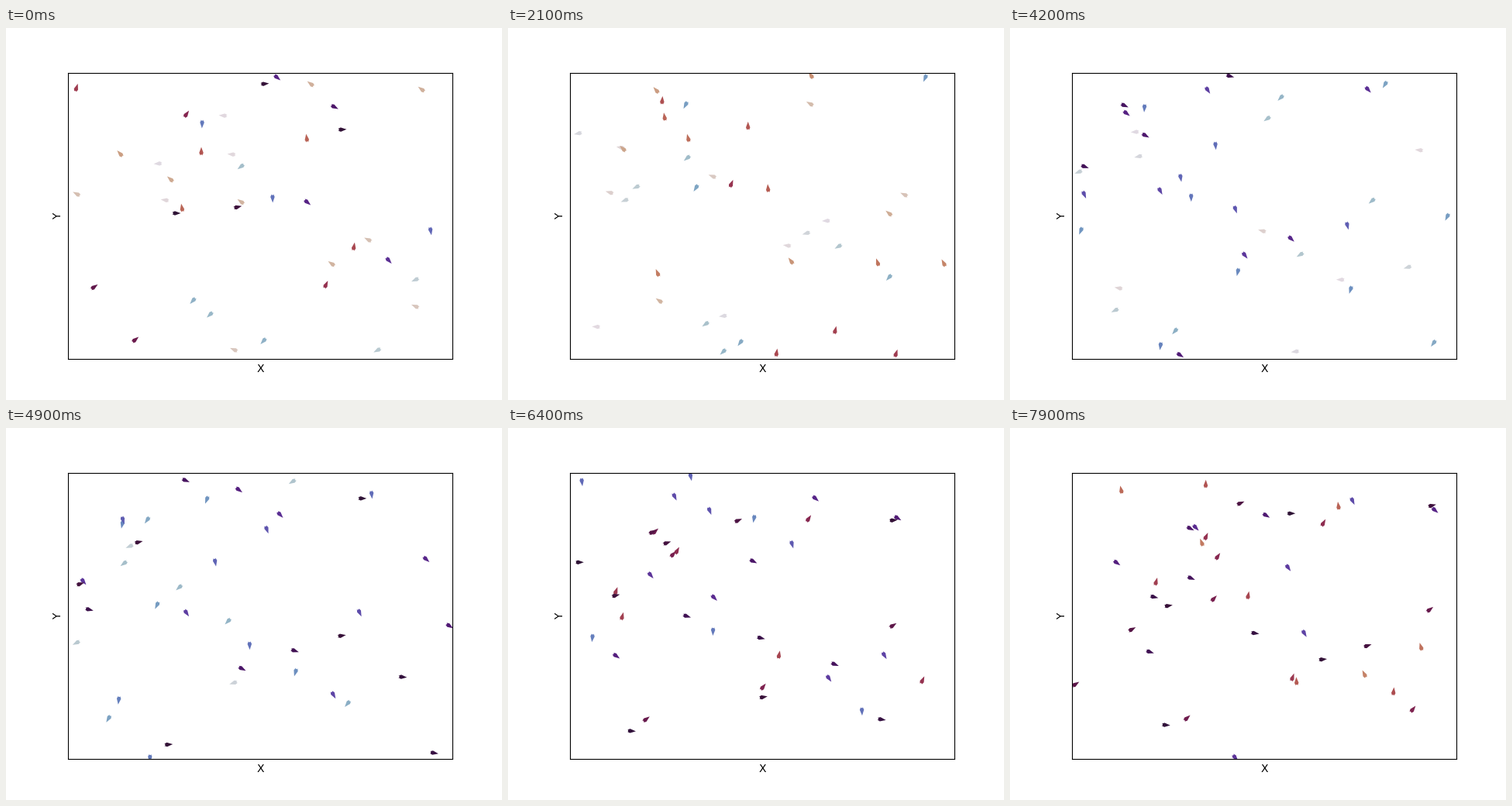
Write a matplotlib script that moves like this. It is 640x480 px and loops after 8000 ms.

```python
import numpy as np
import matplotlib.pyplot as plt
from matplotlib.animation import FuncAnimation

FRAMES = 80
SIZE = 10.0      # side of the periodic box
SPEED = 0.1      # distance per step
NOISE = np.pi    # full width of the heading noise

# Start of each agent: x and y of its middle in pixels, heading in degrees
START = np.array([
    (91, 77, 72), (334, 72, 5), (350, 64, -40), (393, 72, 143),
    (536, 79, 143), (424, 102, -28), (434, 131, 3), (233, 111, 55),
    (280, 113, 176), (253, 124, -92), (252, 159, 90), (388, 142, 98),
    (147, 162, 132), (291, 163, 175), (303, 179, -143), (196, 175, -176),
    (212, 195, 139), (91, 214, 152), (205, 222, 172), (227, 232, 100),
    (220, 239, 0), (303, 224, 145), (299, 231, 14), (344, 220, -88),
    (389, 225, -40), (548, 262, -80), (467, 273, 153), (449, 282, 80),
    (420, 304, 145), (494, 300, -48), (413, 331, 65), (528, 325, -156),
    (528, 359, 157), (114, 334, 35), (241, 352, -132), (263, 370, -137),
    (167, 402, 40), (294, 415, 157), (332, 404, -132), (479, 416, -152),
], float)

# Slow turn of the shared heading: step, degrees
TURN = np.array([(1, 163), (6, 157), (13, 140), (17, 135), (21, 157),
                 (27, 188), (34, 199), (41, 250), (49, 288), (56, 327),
                 (64, 349), (71, 375), (79, 386)], float)


def unit(angle):
    return np.column_stack([np.cos(angle), np.sin(angle)])


def wrap(angle):
    return (angle + np.pi) % (2 * np.pi) - np.pi


def start_state():
    heading = np.radians(START[:, 2])
    tail = START[:, :2] - 4.5 * unit(heading) * [1, -1]
    pos = (tail - [80, 427.2]) / [496, -369.6] * SIZE
    return pos % SIZE, heading


def simulate(seed=4):
    rng = np.random.default_rng(seed)
    pos, heading = start_state()
    spread = np.linspace(-0.5, 0.5, len(pos)) * NOISE
    states = [(pos, heading)]
    for step in range(1, FRAMES):
        pos = (pos + SPEED * unit(heading)) % SIZE
        shared = np.radians(np.interp(step, TURN[:, 0], TURN[:, 1]))
        heading = wrap(shared + rng.permutation(spread))
        states.append((pos, heading))
    return states


states = simulate()

fig, ax = plt.subplots(figsize=(6.4, 4.8), dpi=100)
ax.set(xlim=(0, SIZE), ylim=(0, SIZE), xticks=[], yticks=[],
       xlabel="X", ylabel="Y")

pos, heading = states[0]
arrows = ax.quiver(*pos.T, *unit(heading).T, heading, cmap="twilight",
                   clim=(-np.pi, np.pi), scale=50, width=0.005,
                   headwidth=2.2, headlength=3)


def update(i):
    pos, heading = states[i]
    arrows.set_offsets(pos)
    arrows.set_UVC(*unit(heading).T, heading)
    return arrows,


anim = FuncAnimation(fig, update, frames=FRAMES, interval=100,
                     repeat=True, repeat_delay=0)
plt.show()
```
